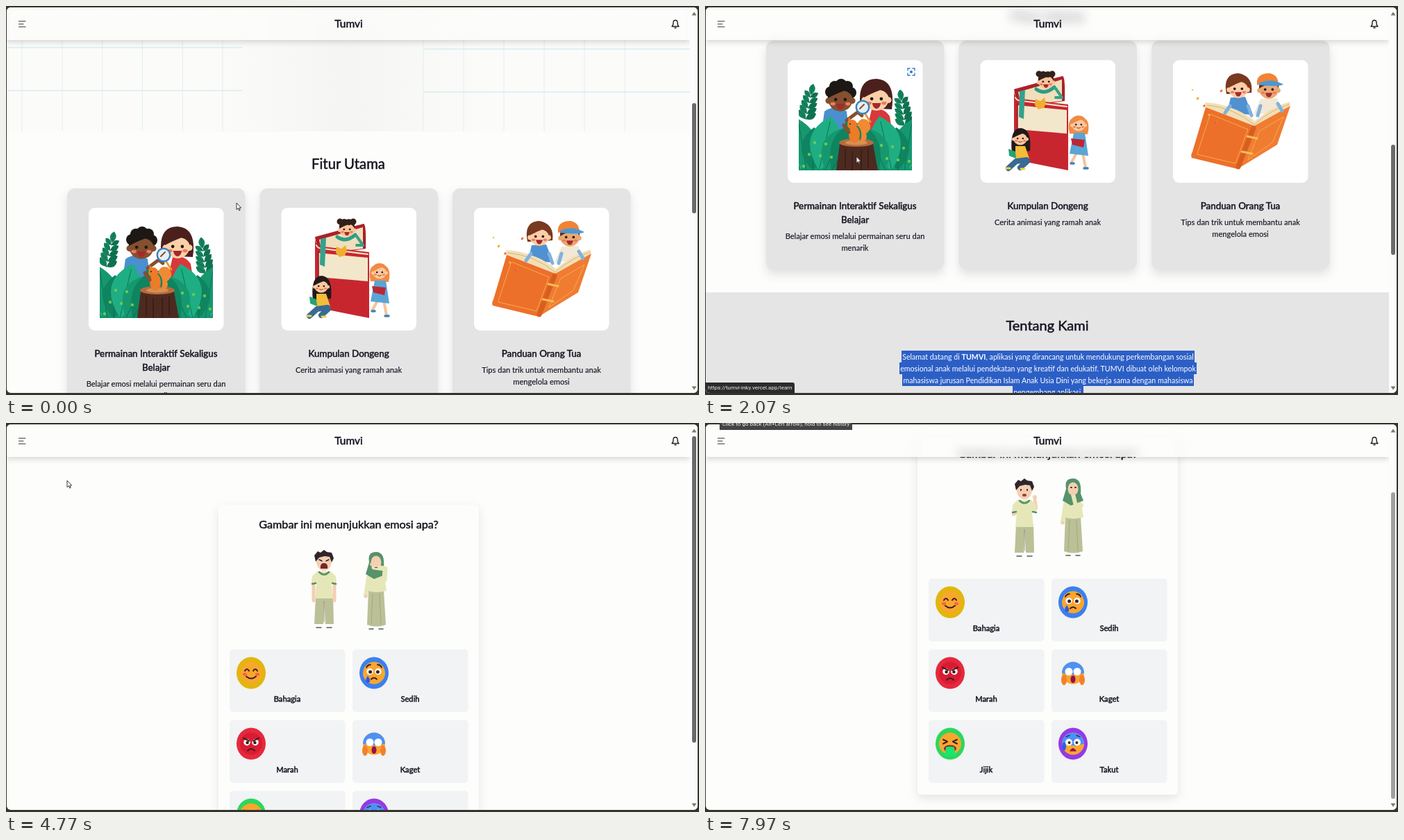
Recreate the animation shown at these times as an HTML page. Size 998 by 561 pixels, loop 8 s.

```html
<!DOCTYPE html>
<html lang="id">
<head>
<meta charset="utf-8">
<title>Tumvi</title>
<style>
html, body { margin: 0; width: 100%; height: 100%; overflow: hidden; background: #35332d; }
#stage { position: relative; width: 998px; height: 561px; overflow: hidden; font-family: Lato, sans-serif; color: #151520; }
#window { position: absolute; inset: 0; background: #fdfdfc; clip-path: inset(2px 2px 3px 1px round 6px); }
.page { position: absolute; left: 0; top: 0; width: 988px; }
svg { position: absolute; left: 0; top: 0; overflow: visible; }
svg text { text-anchor: middle; fill: #151520; stroke: #151520; stroke-width: .15; stroke-linejoin: round; }
svg text.strong { stroke-width: .5; }
.card { fill: #e4e4e5; filter: drop-shadow(0 7px 7px rgba(30, 30, 60, .13)); }
.panel { fill: #fdfdfc; filter: drop-shadow(0 5px 7px rgba(30, 30, 40, .11)); }
.option { fill: #f1f3f4; }
.option.hover { fill: #e2e3e8; }
#about { position: absolute; left: 0; top: 709.5px; width: 988px; text-align: center; font-size: 10.65px; line-height: 17px; color: #30303a; }
#about p { margin: 0 0 17px; }
#about span { padding: 2px 1px; background: #bababb; -webkit-box-decoration-break: clone; box-decoration-break: clone; }
#about.active span { background: #2c5fc6; color: #fff; }
#header { position: absolute; left: 0; top: 0; width: 985px; height: 49px; overflow: hidden; background: #fdfdfc; }
#headerShadow { position: absolute; left: 0; top: 0; width: 985px; height: 49px; box-shadow: 0 3px 8px rgba(40, 40, 30, .18); }
#frosted { overflow: hidden; filter: blur(8px); opacity: .42; }
#bar { position: absolute; left: 985px; top: 0; width: 12px; height: 561px; background: #fcfcfc; }
#thumb { position: absolute; left: 2.5px; width: 6px; border-radius: 3px; background: #6b6b6b; }
.bubble { position: absolute; font: 8px Roboto, sans-serif; color: #eee; background: #2b2b2b; white-space: pre; }
#status { left: 1px; top: 543px; height: 15px; line-height: 15px; padding: 0 4px 0 3px; border-radius: 0 3px 0 0; }
#tip { left: 21px; top: -5px; height: 15px; line-height: 14px; padding: 0 4px; background: #444; }
</style>
</head>
<body>
<div id="stage">
  <div id="window">
    <div class="page" id="home">
      <svg width="988" height="561"><g id="homeArt"></g></svg>
      <div id="about">
        <p><span>Selamat datang di <b>TUMVI</b>, aplikasi yang dirancang untuk mendukung perkembangan sosial<br>emosional anak melalui pendekatan yang kreatif dan edukatif. TUMVI dibuat oleh kelompok<br>mahasiswa jurusan Pendidikan Islam Anak Usia Dini yang bekerja sama dengan mahasiswa<br>pengembang aplikasi.</span></p>
        <p><span>Tujuan utama kami adalah menghadirkan pembelajaran bermakna yang memperkuat<br>keterampilan sosial dan emosional anak. Aplikasi ini dirancang khusus untuk anak usia 3-4<br>tahun, dengan konten yang sesuai perkembangan usia mereka.</span></p>
        <p><span>Di dalam aplikasi TUMVI, kami menggabungkan kisah inspiratif, ekspresi wajah, dan permainan<br>interaktif untuk membantu anak-anak belajar nilai-nilai penting, seperti empati, kejujuran,<br>dan kerja sama, dalam suasana yang menyenangkan dan aman.</span></p>
      </div>
    </div>
    <div class="page" id="quiz"><svg width="988" height="561"><g id="quizArt"></g></svg></div>
    <div id="headerShadow"></div>
    <div id="header">
      <svg id="frosted" width="988" height="80"><use id="homeBehind" href="#homeArt"/><use id="quizBehind" href="#quizArt"/></svg>
    </div>
    <svg id="headerArt" width="988" height="561"></svg>
    <div id="bar"><div id="thumb"></div>
      <svg width="12" height="561" fill="#777"><path d="M2.5 13.5L6 8.5L9.5 13.5ZM2.5 548.5L6 553.5L9.5 548.5Z"/></svg>
    </div>
    <div class="bubble" id="status"></div>
  </div>
  <div class="bubble" id="tip">Click to go back (Alt+Left arrow), hold to see history</div>
  <svg width="998" height="561">
    <g id="cursor" fill="#fff" stroke="#222" stroke-width=".9" stroke-linejoin="round">
      <path id="arrow" d="M0 0V9.5L2.3 7.6L3.8 11L5.2 10.3L3.8 7.1H6.6Z"/>
      <path id="hand" d="M-1.2 1Q0-.8 1.2 1V4.5L5 5.5Q6 6 5.7 8L4.5 12.5H-1.5L-4.5 8Q-4.5 6.3-2.8 7L-1.2 8Z"/>
    </g>
  </svg>
</div>
<script>
const $ = id => document.getElementById(id);

// Drawing helpers
const oval = (x, y, rx, ry, fill) => `<ellipse cx="${x}" cy="${y}" rx="${rx}" ry="${ry}" fill="${fill}"/>`;
const dot = (x, y, r, fill) => oval(x, y, r, r, fill);
const fill = (d, color) => `<path d="${d}" fill="${color}"/>`;
const line = (d, color, w = 1) => `<path d="${d}" fill="none" stroke="${color}" stroke-width="${w}" stroke-linecap="round" stroke-linejoin="round"/>`;
const box = (x, y, w, h, r, attr) => `<rect x="${x}" y="${y}" width="${w}" height="${h}" rx="${r}" ${attr}/>`;
const text = (x, y, str, size, cls = '') => `<text x="${x}" y="${y + size * .34}" font-size="${size}" class="${cls}">${str}</text>`;
const at = (x, y, body, extra = '') => `<g transform="translate(${x} ${y}) ${extra}">${body}</g>`;

// A child's head with unit radius 10
const head = (x, y, r, skin, hair, open = true) => at(x, y,
  dot(-9.5, 2, 2.5, skin) + dot(9.5, 2, 2.5, skin) + oval(0, 1, 9.8, 9.5, skin) +
  fill('M-10 0Q-11-12 0-12Q11-12 10 0Q8-5 3-6Q-5-3-10 0Z', hair) +
  dot(-3.8, 1, 1.3, '#24160f') + dot(3.8, 1, 1.3, '#24160f') +
  oval(-6, 4.5, 2, 1.3, '#f07a5c') + oval(6, 4.5, 2, 1.3, '#f07a5c') +
  (open ? fill('M-3.5 4.5H3.5Q2.5 9 0 9Q-2.5 9-3.5 4.5Z', '#a52a2a') : line('M-2.5 5.5Q0 7.5 2.5 5.5', '#8a3524')),
  `scale(${r / 10})`);

const leaf = (x, y, len, angle, color) => at(x, y,
  fill(`M0 0Q${-len * .55} ${-len * .55} 0 ${-len}Q${len * .55} ${-len * .55} 0 0Z`, color) +
  line(`M0 0V${-len * .9}`, '#0b6b50', .8), `rotate(${angle})`);

const fern = (x, y, angle) => at(x, y,
  [0, 1, 2, 3, 4].map(i => leaf(0, -i * 8, 17 - i, -50, '#16845c') + leaf(0, -i * 8, 17 - i, 50, '#0f7350')).join('') +
  leaf(0, -36, 16, 0, '#16845c'), `rotate(${angle})`);

function jungle() {
  let s = `<clipPath id="picture">${box(135, 300, 163, 150, 0, '')}</clipPath><g clip-path="url(#picture)">`;
  s += fern(145, 376, 12) + fern(288, 385, -8);
  s += fill('M167 400L172 365Q187 354 204 365L208 400Z', '#4a8fd0') + fill('M230 405L240 362Q257 358 266 372L271 405Z', '#d8383c');
  s += [[-14, -9], [-8, -17], [1, -20], [10, -17], [15, -8], [-3, -13], [6, -12]].map(([x, y]) => dot(195 + x, 346 + y, 8, '#1d1715')).join('');
  s += head(195, 346, 18, '#84502f', '#1d1715');
  s += fill('M224 360Q218 318 247 318Q275 320 269 362Z', '#4b201c') + head(247, 345, 18, '#fbd0a8', '#4b201c');
  s += line('M204 378L220 366L226 371', '#84502f', 5) + line('M231 369L238 380', '#e69a35', 3);
  s += dot(227, 359, 10.5, '#3d7fc0') + dot(227, 359, 8, '#e3f0f5') + line('M223 361L229 355', '#8b4a2d', 2);
  s += fill('M135 388L180 396L200 412V450H135ZM298 388L258 396L238 412V450H298Z', '#12946d');
  const greens = ['#1fae83', '#16986f', '#0f8460'];
  for (let i = 0; i < 12; i++) {
    const k = i % 6, right = i > 5, x = right ? 296 - k * 9 : 137 + k * 9;
    s += leaf(x, 450, 88 - (k * 13) % 31, (right ? 1 : -1) * (20 - k * 11), greens[i % 3]);
  }
  for (let i = 0; i < 12; i++) s += dot(142 + (i % 6) * 8 + (i > 5 ? 112 : 0), 444 - (i * 17) % 36, 2.2, '#67c957');
  s += fill('M194 412L189 450H249L242 412Z', '#4d2a20') + line('M202 420V447M212 422V450M225 421V449M235 419V446', '#361b16', 1.5);
  s += oval(218, 410, 25, 6, '#b76b3b') + oval(218, 410, 16, 3.5, '#d59055');
  s += fill('M224 409Q228 392 219 385Q222 373 233 377Q244 388 232 397Q235 405 228 409Z', '#f08a35');
  s += oval(215, 398, 8, 12, '#ed7b27') + dot(212, 384, 7, '#ed7b27') + fill('M206 380L207 373L211 378Z', '#ed7b27');
  return s + dot(209, 383, 1, '#222') + line('M200 385L207 395', '#84502f', 5) + '</g>';
}

function storybook() {
  let s = fill('M445 333L515 314Q519 315 518 350L450 360Z', '#ab202a') + fill('M451 337L514 319V350L455 356Z', '#f0dfba');
  s += fill('M445 337Q446 347 457 347L523 355V450L458 437Q445 434 445 422Z', '#c7262f') + line('M447 345Q449 350 457 350L521 358', '#f4e5c5', 2);
  s += fill('M450 356L521 363V397L450 391Z', '#f3e7cb') + line('M450 354L450 390', '#8d1c25', 1.5);
  s += fill('M453 336L461 334L459 376L452 373Z', '#35a18b') + line('M477 333Q489 342 503 330', '#2d9d86', 5) + line('M505 332L514 345L505 345', '#35a18b', 4);
  s += head(491, 321, 11, '#f9c49b', '#332019') + [-10, -4, 3, 9].map(x => dot(491 + x, 312 - Math.abs(x) / 9, 4.5, '#332019')).join('');
  s += fill('M476 347L483 350L489 345L491 353L488 360L480 362L475 356Z', '#f1ad32');
  s += fill('M442 425Q438 389 455 389Q471 391 468 422Z', '#23191b') + fill('M447 415H461L467 433H447Z', '#f3bd39') + head(454, 403, 10, '#fac89f', '#23191b', false);
  s += line('M463 435L448 437L437 447M464 437L454 446', '#396a91', 8) + line('M434 447H439M455 448H460', '#f5cf45', 3) + fill('M437 419L447 423L448 433L438 429Z', '#29a076');
  s += fill('M525 397Q519 373 538 372Q557 374 551 398Z', '#f18b42') + head(538, 383, 10, '#fac89f', '#f18b42', false);
  s += line('M535 425L528 438M544 425L548 446', '#f7c29a', 4) + line('M527 440H531M546 447H551', '#4284b1', 3.5) + fill('M531 396H547L552 429L525 426Z', '#5aa5d5');
  return s + fill('M527 404L547 406L545 417L529 413Z', '#bd2635');
}

function orangeBook() {
  let s = fill('M752 367L757 345L778 344L788 370Z', '#4f91d1') + fill('M790 370L800 347L824 346L831 365Z', '#f2e8d3');
  s += fill('M751 340Q745 311 768 310Q790 314 787 338Z', '#79391f') + head(768, 331, 14, '#fccda8', '#79391f') + head(812, 332, 14, '#e9a873', '#5b2b1c');
  s += fill('M795 327Q793 310 813 310Q826 312 826 328Q810 323 795 327Z', '#f08335') + fill('M798 324Q815 316 833 326Q827 330 798 327Z', '#4b98d3');
  s += fill('M720 352Q760 354 792 379Q816 358 842 351L842 359L791 395L722 365Z', '#f3dfb5') + line('M723 356Q760 359 791 384Q816 362 841 355', '#c8a878', .8);
  s += fill('M721 359L791 386L767 448L701 432Q699 428 702 423Z', '#ed702a') + fill('M791 386L843 357L824 413L767 448Z', '#f07c32');
  s += line('M728 369L782 391L764 440L709 427ZM799 393L833 373L817 410L782 435Z', '#f4ab4d') + line('M790 389L768 445', '#d85e20', 7) + line('M781 401L795 404M773 423L788 426', '#f6bd54', 3);
  s += line('M756 357L749 367M782 357L787 371M800 357L796 371M825 354L831 364', '#7fb2df', 5);
  const colors = ['#f3bd3c', '#e65a3e', '#f39b3c'];
  for (let i = 0; i < 11; i++) s += dot(702 + (i * 17) % 43, 334 + (i * 23) % 57, 1.2 + i % 2 * .5, colors[i % 3]);
  return s;
}

function buildHome() {
  let s = `<linearGradient id="mist"><stop offset=".3" stop-color="#fbfbfa"/><stop offset=".5" stop-color="#f5f5f4"/><stop offset=".7" stop-color="#fbfbfa"/></linearGradient>`;
  s += box(0, -400, 985, 581, 0, 'fill="url(#mist)"');
  for (let i = 0; i < 6; i++) s += line(`M${23 + i * 57.8}-200V180M${601 + i * 58}-200V180`, '#e0eff1');
  s += line('M2 60H340M2 122H340M601 62H985M601 124H985', '#d8edf0', 1.3);
  s += text(493, 228, 'Fitur Utama', 20.3, 'strong');
  const cards = [
    [88, ['Permainan Interaktif Sekaligus', 'Belajar'], ['Belajar emosi melalui permainan seru dan', 'menarik']],
    [365.5, ['Kumpulan Dongeng'], ['Cerita animasi yang ramah anak']],
    [643, ['Panduan Orang Tua'], ['Tips dan trik untuk membantu anak', 'mengelola emosi']]];
  for (const [x, titles, notes] of cards) {
    s += box(x, 263, 256.5, 330, 11, 'class="card"') + box(x + 31, 291, 194.5, 177, 9, 'fill="#fff"');
    titles.forEach((t, i) => s += text(x + 128, 501 + i * 20, t, 13.4, 'strong'));
    notes.forEach((t, i) => s += text(x + 128, 505 + titles.length * 20 + i * 17, t, 11.1));
  }
  s += jungle() + storybook() + orangeBook();
  s += `<g id="lens">${dot(297, 308, 10, '#eee') + dot(297, 308, 9.5, '#fff') + dot(297, 308, 2, '#2f75c8') +
    line('M292 306V303H295M299 303H302V306M302 310V313H299M295 313H292V310', '#2f75c8', 1.3)}</g>`;
  s += box(0, 626, 986, 700, 0, 'fill="#e5e5e6"') + text(493, 674, 'Tentang Kami', 20, 'strong');
  $('homeArt').innerHTML = s;
}

// Emotion faces, centred on the origin
const orange = '#f9a62f', ink = '#3a2020';
const eyes = (r, pupil) => [-6, 6].map(x => dot(x, -2, r, '#fff') + (pupil ? dot(x * .9, -1.5, pupil, ink) : '')).join('');
const blueTop = dot(0, 0, 16, orange) + fill('M-16 0A16 16 0 0 1 16 0Q0 5-16 0Z', '#4e91f5');
const emotions = [
  ['Bahagia', '#e3b50e', dot(0, 0, 15, orange) + line('M-9-3Q-6-8-3-3M3-3Q6-8 9-3M-7 5Q0 11 7 5', ink, 2) + oval(-9, 2, 3, 2.2, '#f2663f') + oval(9, 2, 3, 2.2, '#f2663f')],
  ['Sedih', '#3b80ee', dot(0, 0, 16, orange) + eyes(4.7, 2.5) + line('M-11-8Q-9-12-5-12M5-12Q9-12 11-8M-4 9Q0 5 4 9', ink, 1.8) + fill('M-9 4Q-14 11-10 14Q-5 15-6 9Z', '#3957df')],
  ['Marah', '#e5293d', dot(0, 0, 16, '#d91b33') + eyes(4.7, 2.3) + line('M-11-8L-3-4M11-8L3-4M-5 10Q0 5 5 10', ink, 2)],
  ['Kaget', 'none', blueTop + eyes(5.5, 0) + oval(0, 9, 3.5, 5.5, '#951052') + oval(-13, 10, 4, 7.5, '#f4812b') + oval(13, 10, 4, 7.5, '#f4812b')],
  ['Jijik', '#2bd75e', dot(0, 0, 16, orange) + line('M-10-6L-4-3L-10 0M10-6L4-3L10 0', ink, 2) + oval(0, 7, 9, 5, '#8f2140') + fill('M-6 5Q0 3 6 5L8 18H-8Z', '#18e66d')],
  ['Takut', '#9439e8', blueTop + eyes(5, 2) + line('M-10-10L-5-12M10-10L5-12', '#203a70', 1.5) + fill('M-5 11Q0 2 5 11Z', '#951052') + oval(-13, 4, 3, 6, '#315fe2')]];

function child(girl, scared) {
  const skin = '#f4cfb2', cloth = '#e6e7b8', trim = '#57926a', bottom = '#bcc096', outline = '#686b52';
  let s = '';
  if (girl) {
    s += line('M-5 108L-6 110M5 108L6 110', '#fff', 5) + line('M-10 111H-4M4 111H10', '#456252', 1.5);
    s += fill('M-11 55H11L14 105Q0 110-13 105Z', bottom) + line('M-5 60L-7 104M5 60L7 104', '#999e78', .7);
    s += fill('M-10 30H11L15 56Q0 60-12 56Z', cloth) + line('M-11 37L-15 63', cloth, 6) + dot(-15, 64, 2.5, skin);
    s += fill('M-10 15Q-13 0 0 0Q13 0 11 22L15 32L-3 39L-15 32Z', trim) + oval(0, 15, 7.5, 9.5, skin);
    s += scared ? line('M-3 13H-2M3 13H4', ink, 1.8) + line('M12 39L5 43L0 23', cloth, 6) + dot(0, 21, 3.5, skin)
      : line('M12 40L13 24L-3 22', cloth, 7) + line('M-7 18L1 19', skin, 4) + fill('M-3 23Q0 20 3 23Z', '#9a3e38');
  } else {
    s += line('M-6 109H-7M6 109H7', '#fff', 6) + line('M-11 112H-4M4 112H11', '#456252', 1.5);
    s += fill('M-12 66H13L14 107H2L0 72L-1 107H-14Z', bottom) + line('M0 74V104', outline, .7);
    s += scared ? line('M-12 39L-16 52L2 43M12 38L17 43L15 30', skin, 4.5) + dot(15, 27, 3, skin) : line('M-15 42L-15 73M15 42L15 73', skin, 5);
    s += fill('M-10 31H10L17 38L17 49L11 49L13 70H-13L-11 49L-18 49L-17 38Z', cloth) + line('M-17 49L-12 48M17 49L12 48M-7 32Q0 39 7 32', trim, 2.5);
    s += oval(0, 16, 11, 14, skin) + fill('M-12 17L-14 8L-9 2L-5 4L0 0L4 3L11 4L14 12L11 18L8 10L1 9L-7 11Z', '#30252a');
    s += scared ? line('M-5 16V17M4 16V17', ink, 2) + oval(0, 24, 3, 2, '#9a3e38')
      : line('M-7 14L-3 16M7 14L3 16', ink, 1.5) + fill('M-5 27Q-6 19 0 19Q6 19 5 27Z', '#78272b');
  }
  return s;
}

function buildQuiz() {
  let s = box(306, 118, 375, 520, 6, 'class="panel"') + text(493.5, 146, 'Gambar ini menunjukkan emosi apa?', 16.2, 'strong');
  s += `<g id="sad">${at(458, 183, child(false, false)) + at(533, 186, child(true, false))}</g>`;
  s += `<g id="scared">${at(460, 182, child(false, true)) + at(530, 182, child(true, true))}</g>`;
  emotions.forEach(([name, color, art], i) => {
    const x = 322 + i % 2 * 177, y = 326.5 + (i >> 1) * 102;
    s += box(x, y, 166.5, 90.5, 5, 'class="option"') + at(x + 31, y + 34, oval(0, 0, 21, 23, color) + art) + text(x + 83, y + 71.5, name, 11.2, 'strong');
  });
  $('quizArt').innerHTML = s;
}

function buildHeader() {
  $('headerArt').innerHTML = text(493.5, 26, 'Tumvi', 15.5, 'strong') + line('M18.5 22H28M18.5 26H25M18.5 30H28', '#333', 1.2) +
    line('M959 29.5Q961 28 961 24Q961 20.5 964 20.5Q967 20.5 967 24Q967 28 969 29.5ZM963 31.5H965', '#222', 1.4);
}

// Eased value along [time, value...] stops
function track(t, stops) {
  let i = 0;
  while (i < stops.length - 1 && t >= stops[i + 1][0]) i++;
  const a = stops[i], b = stops[i + 1] || a;
  const k = Math.max(0, Math.min(1, (t - a[0]) / (b[0] - a[0] || 1)));
  const e = k * k * (3 - 2 * k);
  return a.slice(1).map((v, j) => v + (b[j + 1] - v) * e);
}

const homeScroll = [[30, 0], [570, 354], [1000, 354], [1650, 213]];
const quizScroll = [[3800, 46.5], [4300, 0], [6100, 0], [6500, 83], [6660, 83], [6850, 102]];
const pointer = [[860, 332, 284], [2040, 218, 217], [2500, 218, 217], [3100, 402, 290], [3500, 402, 290], [4600, 88, 83], [5000, 88, 83],
  [5220, 54, 66], [5720, 600, 455], [6050, 582, 385], [6450, 578, 335], [6700, 578, 335], [7480, 580, 470], [7880, 120, -20]];

const show = (id, on) => $(id).style.display = on ? '' : 'none';
const between = (t, a, b) => t >= a && t < b;

function placePage(id, visible, scroll) {
  show(id, visible);
  show(id + 'Behind', visible);
  $(id).style.transform = `translateY(${-scroll}px)`;
  $(id + 'Behind').setAttribute('y', -scroll);
}

buildHome();
buildQuiz();
buildHeader();
const options = [...document.querySelectorAll('.option')];

function render(t) {
  const onHome = t < 2500, onQuiz = t >= 3200;
  const [hs] = track(t, homeScroll), [qs] = track(t, quizScroll), [x, y] = track(t, pointer);
  placePage('home', onHome, hs);
  placePage('quiz', onQuiz, qs);
  $('about').className = t >= 1000 ? 'active' : '';
  show('lens', t >= 1900);
  show('sad', between(t, 3600, 6150));
  show('scared', t >= 6150);

  let onOption = false;
  options.forEach((o, i) => {
    const dx = x - 322 - i % 2 * 177, dy = y + qs - 326.5 - (i >> 1) * 102;
    const inside = onQuiz && between(dx, 0, 167) && between(dy, 0, 93);
    o.classList.toggle('hover', inside);
    onOption ||= inside && dy < 90;
  });
  const hand = onOption || between(t, 2150, 2500);
  show('hand', hand);
  show('arrow', !hand);
  $('cursor').setAttribute('transform', `translate(${x} ${y})`);

  const thumb = $('thumb').style;
  thumb.top = (onHome ? 139.5 + hs * .285 : 19 + qs * .79) + 'px';
  thumb.height = (onHome ? 159 : 442) + 'px';
  thumb.background = t >= 7850 ? '#a0a0a0' : '#6b6b6b';

  show('status', between(t, 1900, 2500) || between(t, 2850, 3600));
  $('status').textContent = 'https://tumvi-inky.vercel.app/learn' + (t >= 2500 ? '/playground' : '');
  show('tip', t >= 7920);
}

function tick() {
  render(performance.now() % 8000);
  requestAnimationFrame(tick);
}
tick();
</script>
</body>
</html>
```
